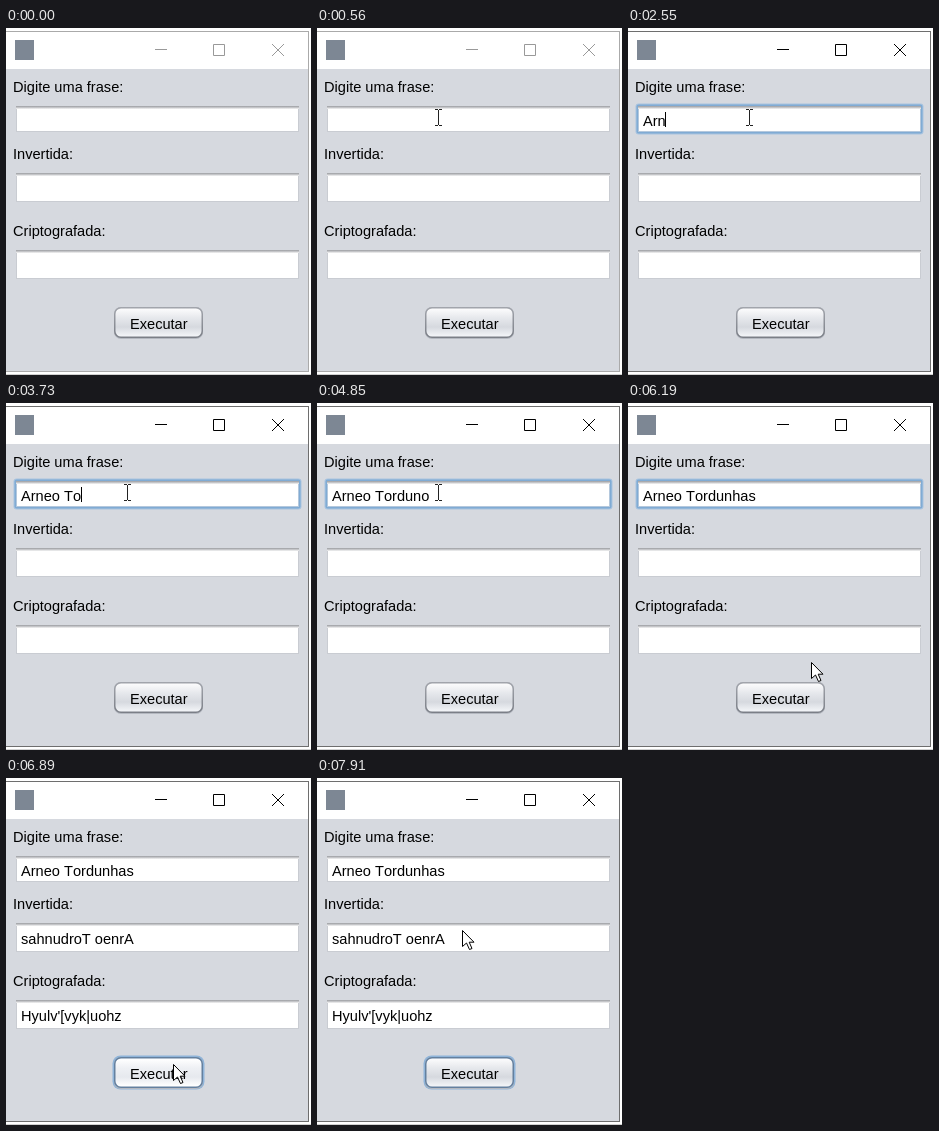
An HTML page with a canvas that plays this animation: 305 by 347 pixels, repeating every 8 s.

```html
<!DOCTYPE html>
<html lang="pt">
<head>
<meta charset="utf-8">
<title>Criptografia</title>
<style>
html, body { margin: 0; width: 305px; height: 347px; overflow: hidden; background: #fff; }
canvas { display: block; }
</style>
</head>
<body>
<canvas id="stage" width="305" height="347"></canvas>
<script>
const ctx = document.getElementById('stage').getContext('2d');
const LOOP = 8000, STEP = 66, BLINK = 500;
const ACTIVE = 1300, PRESS = 6720, RESULT = 6810, CLICK = 70;
const FONT = '14.6px "Liberation Sans", Arial, sans-serif';
const BODY = '#d6d9df';

const NAME = 'Arneo Tordunhas';
const REVERSED = [...NAME].reverse().join('');
const SHIFTED = [...NAME].map(c => String.fromCharCode(c.charCodeAt(0) + 7)).join('');

// Keys as pressed: one typo, erased with a backspace.
const KEYS = NAME.slice(0, 12) + 'o\b' + NAME.slice(12);
const KEY_TIMES = [2300, 2500, 2550, 2750, 2930, 3180, 3430, 3610, 3740,
  3860, 4040, 4170, 4350, 4940, 5020, 5110, 5290];

// Pointer strokes: a time span and a quadratic curve
const STROKES = [
  { span: [50, 190], from: [210, 235], bend: [168, 182], to: [131, 135] },
  { span: [310, 560], from: [131, 135], bend: [128, 115], to: [121, 89] },
  { span: [5790, 6190], from: [121, 89], bend: [360, 150], to: [183, 259] },
  { span: [6310, 6640], from: [183, 259], bend: [175, 272], to: [167, 286] },
  { span: [7324, 7910], from: [167, 286], bend: [156, 219], to: [145, 152] }
];

function pointerAt(t) {
  const s = STROKES.findLast(s => s.span[0] <= t);
  if (!s) return null;
  const [start, end] = s.span;
  const steps = Math.round((end - start) / STEP);
  const u = Math.min(1, Math.floor((t - start) / (end - start) * steps + 1e-6) / steps);
  return [0, 1].map(i => Math.round(
    s.from[i] * (1 - u) ** 2 + 2 * s.bend[i] * u * (1 - u) + s.to[i] * u * u));
}

function typedAt(t) {
  let text = '', since = ACTIVE;
  KEY_TIMES.forEach((time, i) => {
    if (time > t) return;
    text = KEYS[i] === '\b' ? text.slice(0, -1) : text + KEYS[i];
    since = time;
  });
  return { text, since };
}

const within = (v, low, size) => v >= low && v < low + size;

function rect(x, y, w, h, color) {
  ctx.fillStyle = color;
  ctx.fillRect(x, y, w, h);
}

function round(x, y, w, h, r, fill) {
  ctx.beginPath();
  ctx.roundRect(x, y, w, h, r);
  ctx.fillStyle = fill;
  ctx.fill();
}

function text(s, x, y) {
  ctx.fillStyle = '#000';
  ctx.fillText(s, x, y);
}

function vertical(y, h, ...colors) {
  const g = ctx.createLinearGradient(0, y, 0, y + h);
  colors.forEach((c, i) => g.addColorStop(i / (colors.length - 1), c));
  return g;
}

function drawWindow(active) {
  const edge = active ? '#6e6e6e' : '#aaaaaa';
  rect(0, 0, 305, 347, '#fff');
  rect(0, 346, 305, 1, '#d0d0d0');
  rect(0, 3, 303, 341, edge);
  rect(0, 4, 302, 37, '#fff');
  rect(0, 41, 302, 302, BODY);
  rect(9, 12, 19, 20, '#7d8794');

  ctx.strokeStyle = active ? '#000' : '#999';
  ctx.lineWidth = 1;
  ctx.beginPath();
  ctx.moveTo(149, 21.5);
  ctx.lineTo(161, 21.5);
  ctx.rect(207.5, 16.5, 11, 11);
  ctx.moveTo(266, 16);
  ctx.lineTo(278, 28);
  ctx.moveTo(278, 16);
  ctx.lineTo(266, 28);
  ctx.stroke();
}

function drawField(y, h, focused) {
  if (focused) {
    round(7.5, y - 2.5, 288, h + 5, 3, '#a9c4e0');
    round(8.5, y - 1.5, 286, h + 3, 2, '#80abd4');
  }
  rect(10, y, 283, h, focused ? '#b4c8dd' : '#c9ccd2');
  rect(11, y + 1, 281, h - 2, '#fff');
  rect(10, y, 283, 3, vertical(y, 3, '#9a9ca0', '#c4c5c8', '#f6f6f6'));
}

function drawButton(hover, pressed, focused) {
  if (focused) round(106.5, 277.5, 92, 34, 8, '#8fb4d9');
  round(108, 279, 89, 32, 7, '#b4b8c0');
  round(108, 279, 89, 31, 7, focused ? '#64809f' : vertical(279, 31, '#a2a5ac', '#7a7e86'));
  const fill = pressed ? ['#a5abb6', '#8f97a5', '#b8bec9']
    : hover ? ['#ffffff', '#eef0f4', '#e6e9ee', '#ffffff']
    : ['#fbfbfc', '#e6e8ec', '#d6d9df', '#f2f4f7'];
  round(109.5, 280.5, 86, 28, 5.5, vertical(281, 27, ...fill));
  text('Executar', 124, 301);
}

function drawBeam(x, y) {
  rect(x, y - 7, 1, 15, '#222');
  for (const end of [y - 8, y + 8]) {
    rect(x - 3, end, 3, 1, '#222');
    rect(x + 1, end, 3, 1, '#222');
  }
}

function drawArrow(x, y) {
  const shape = [[0, 0], [0, 16], [4, 12.5], [7, 19], [9.5, 18], [6.7, 11.7], [11.5, 11.7]];
  ctx.beginPath();
  shape.forEach(([dx, dy]) => ctx.lineTo(x + 0.5 + dx, y + 0.5 + dy));
  ctx.closePath();
  ctx.fillStyle = '#fff';
  ctx.fill();
  ctx.strokeStyle = '#000';
  ctx.lineWidth = 1;
  ctx.stroke();
}

function drawGlow(x, y) {
  ctx.globalCompositeOperation = 'multiply';
  ctx.beginPath();
  ctx.arc(x - 2, y - 0.5, 15, 0, Math.PI * 2);
  ctx.fillStyle = '#ffff80';
  ctx.fill();
  ctx.globalCompositeOperation = 'source-over';
}

function drawPointer(t, [x, y]) {
  if (within(t, ACTIVE, CLICK) || within(t, PRESS, 2 * CLICK + 30)) drawGlow(x, y);
  const overInput = within(x, 10, 283) && within(y, 78, 26);
  (overInput ? drawBeam : drawArrow)(x, y);
}

function draw(t) {
  ctx.font = FONT;
  ctx.fontKerning = 'none';
  const typed = typedAt(t);
  const pointer = pointerAt(t);
  const focused = t >= ACTIVE && t < PRESS;
  const hover = pointer && within(pointer[0], 109, 88) && within(pointer[1], 280, 30);

  drawWindow(t >= ACTIVE);
  text('Digite uma frase:', 7, 64);
  text('Invertida:', 7, 131);
  text('Criptografada:', 7, 208);
  drawField(78, 26, focused);
  drawField(145, 29, false);
  drawField(222, 29, false);

  text(typed.text, 15, 98);
  if (focused && Math.floor((t - typed.since) / BLINK) % 2 === 0) {
    rect(Math.floor(15 + ctx.measureText(typed.text).width), 84, 1, 15, '#000');
  }
  if (t >= RESULT) {
    text(REVERSED, 15, 166);
    text(SHIFTED, 15, 243);
  }
  drawButton(hover, t >= PRESS && t < RESULT, t >= PRESS);
  if (pointer) drawPointer(t, pointer);
}

const start = performance.now();
function tick() {
  draw((performance.now() - start) % LOOP);
  requestAnimationFrame(tick);
}
tick();
</script>
</body>
</html>
```
